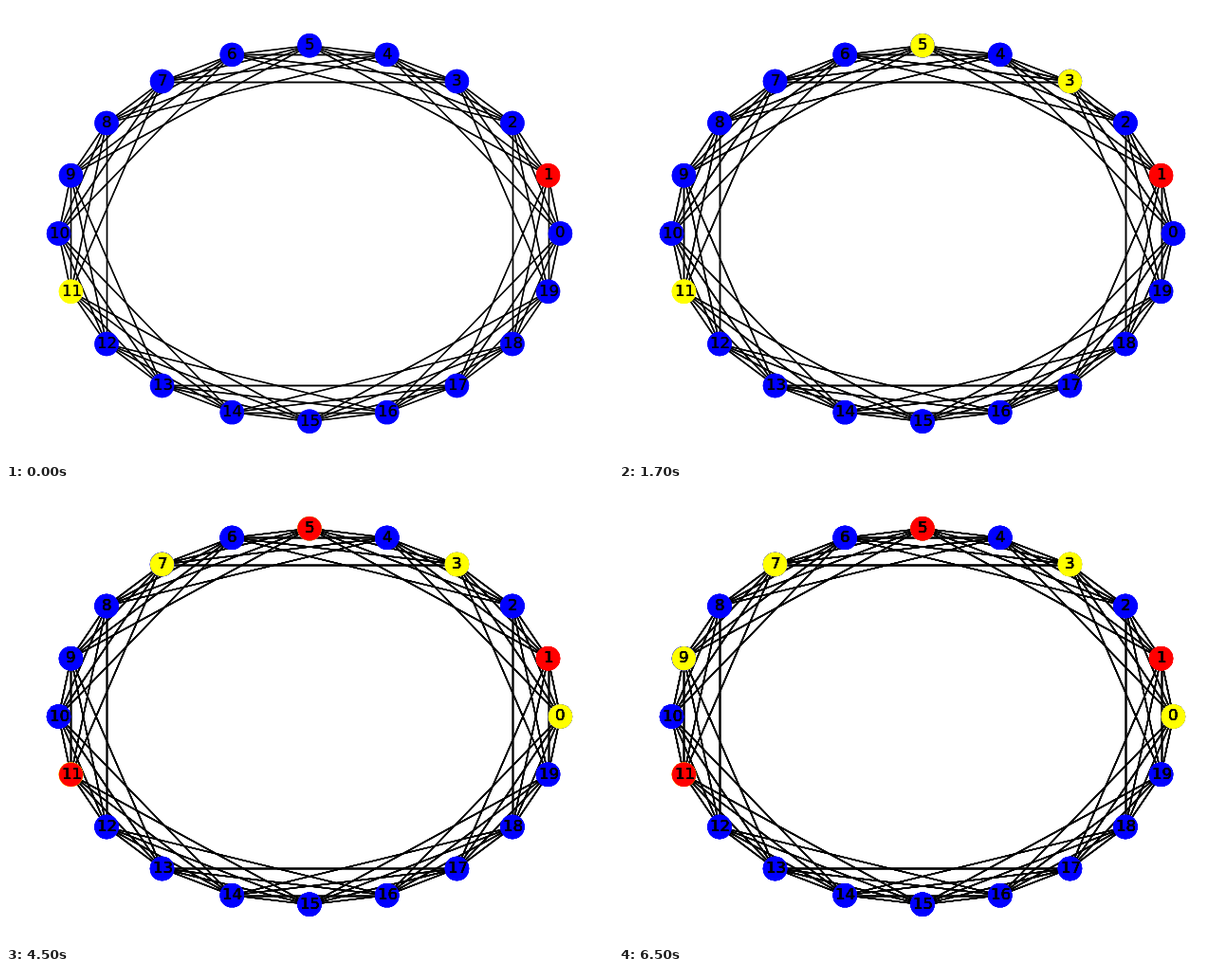
Animation of 640x480 px, one loop 8 s. Source, as an HTML page with a canvas:

```html
<!DOCTYPE html>
<html lang="en">
<head>
<meta charset="utf-8">
<title>Ring network spread</title>
<style>
  html, body { margin: 0; width: 100%; height: 100%; overflow: hidden; background: #fff; }
  canvas { display: block; width: 640px; height: 480px; }
</style>
</head>
<body>
<canvas id="stage" width="640" height="480"></canvas>
<script>
const ctx = document.getElementById('stage').getContext('2d');
const LOOP = 8000, COUNT = 20, REACH = 4;
const PT = 100 / 72;
const RADIUS = (Math.sqrt(300) / 2 + 0.5) * PT;
const SIZE = 12 * PT;

// Each step is painted over the earlier ones, so edges grow darker.
const steps = [
  { at: 0,    red: [1],        yellow: [11] },
  { at: 0,    red: [1],        yellow: [11] },
  { at: 500,  red: [1],        yellow: [3, 5, 11] },
  { at: 2500, red: [1],        yellow: [0, 3, 5, 11] },
  { at: 4500, red: [1, 5, 11], yellow: [0, 3, 7] },
  { at: 6500, red: [1, 5, 11], yellow: [0, 3, 7, 9] }
];

const setFont = px => { ctx.font = px + 'px "DejaVu Sans", sans-serif'; };

// Single-precision angles decide which way half-pixel ties fall.
const nodes = Array.from({ length: COUNT }, (_, i) => {
  const a = Math.fround(i * 2 * Math.PI / COUNT);
  return { x: 320 + 320 / 1.21 * Math.cos(a), y: 240 - 240 / 1.21 * Math.sin(a) };
});

// Labels are centred by advance, then their ink is put on whole pixels.
// Measuring at a large size avoids rounded metrics.
setFont(1000);
const labels = nodes.map((n, i) => {
  const m = ctx.measureText(i), k = SIZE / 1000;
  const bearing = -m.actualBoundingBoxLeft * k;
  const left = n.x - m.width * k / 2;
  return {
    x: Math.round(left + bearing) - Math.floor(bearing),
    y: Math.ceil(n.y + 4)
  };
});

const snap = v => Math.floor(v + 0.5) + 0.5;

function drawEdge(a, b) {
  const straight = Math.abs(a.x - b.x) < 0.001 || Math.abs(a.y - b.y) < 0.001;
  const fit = straight ? snap : v => v;
  ctx.beginPath();
  ctx.moveTo(fit(a.x), fit(a.y));
  ctx.lineTo(fit(b.x), fit(b.y));
  ctx.stroke();
}

function drawEdges() {
  nodes.forEach((n, i) => {
    for (let d = 1; d <= REACH; d++) drawEdge(n, nodes[(i + d) % COUNT]);
  });
}

function drawNodes({ red, yellow }) {
  nodes.forEach((n, i) => {
    ctx.fillStyle = red.includes(i) ? '#f00' : yellow.includes(i) ? '#ff0' : '#00f';
    ctx.beginPath();
    ctx.arc(n.x, n.y, RADIUS, 0, 2 * Math.PI);
    ctx.fill();
  });
}

function drawLabels() {
  ctx.fillStyle = '#000';
  labels.forEach((p, i) => ctx.fillText(i, p.x, p.y));
}

function draw(last) {
  const layers = steps.slice(0, last + 1);
  ctx.fillStyle = '#fff';
  ctx.fillRect(0, 0, 640, 480);
  ctx.strokeStyle = '#000';
  ctx.lineWidth = PT;
  setFont(SIZE);
  layers.forEach(drawEdges);
  layers.forEach(drawNodes);
  layers.forEach(drawLabels);
}

const start = performance.now();
let shown = -1;

function tick() {
  const t = Math.max(0, performance.now() - start) % LOOP;
  const now = steps.filter(s => s.at <= t).length - 1;
  if (now !== shown) draw(shown = now);
  requestAnimationFrame(tick);
}
tick();
</script>
</body>
</html>
```
